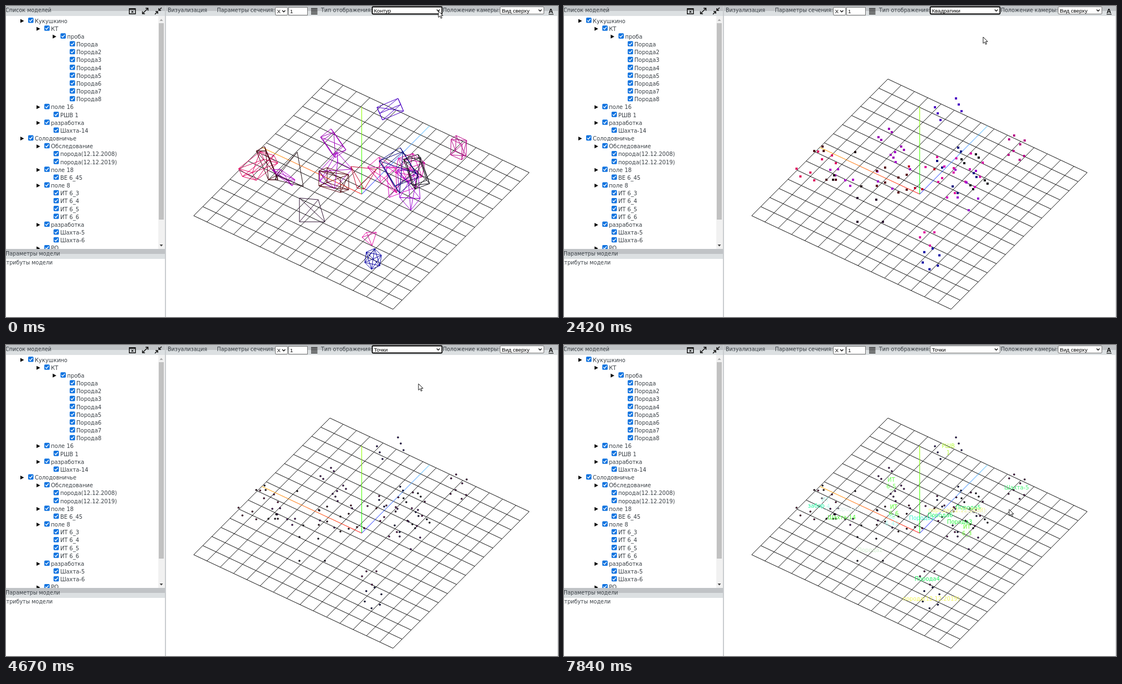
An HTML page for the animation above (7990 ms loop, 997x562 px).

```html
<!DOCTYPE html>
<html lang="ru">
<head>
<meta charset="utf-8">
<title>Визуализация</title>
<style>
html, body { margin: 0; width: 100%; height: 100%; overflow: hidden; background: #fff; }
svg { display: block; width: 997px; height: 562px; }
text { font-family: "DejaVu Sans", sans-serif; font-size: 9.6px; fill: #3a4046; white-space: pre; }
.tree text { font-size: 9.95px; }
.labels text { font-size: 10px; text-anchor: middle; }
text.ui { font-family: "Liberation Sans", Arial, sans-serif; font-size: 9.6px; fill: #000; }
</style>
</head>
<body>
<svg id="stage" viewBox="0 0 997 562"></svg>
<script>
const LOOP = 7990, TICK = LOOP / 60;
const stage = document.getElementById('stage');

function el(tag, attrs = {}, parent = stage) {
  const node = document.createElementNS('http://www.w3.org/2000/svg', tag);
  for (const k in attrs) node.setAttribute(k, attrs[k]);
  parent.appendChild(node);
  return node;
}
const group = (parent = stage, attrs = {}) => el('g', attrs, parent);
const rect = (x, y, width, height, fill, parent, more) =>
  el('rect', { x, y, width, height, fill, ...more }, parent);
const path = (d, stroke, parent, more) =>
  el('path', { d, stroke, fill: 'none', ...more }, parent);
function text(x, y, str, parent, more) {
  const node = el('text', { x, y, ...more }, parent);
  node.textContent = str;
  return node;
}
const ui = (x, y, str, parent) => text(x, y, str, parent, { class: 'ui' });
const defs = el('defs');

// Scene: grid and axes
const scene = group();
let grid = '';
for (let i = 0; i <= 15; i++) {
  const k = i / 15;
  grid += `M${585 - 246 * k} ${132 + 247 * k}l360 169M${585 + 360 * k} ${132 + 169 * k}l-246 247`;
}
path(grid, '#111', scene);

function axis(id, x, y, from, to) {
  const g = el('linearGradient', { id, gradientUnits: 'userSpaceOnUse',
    x1: 642.5, y1: 340, x2: x, y2: y }, defs);
  el('stop', { offset: 0, 'stop-color': from }, g);
  el('stop', { offset: 1, 'stop-color': to }, g);
  path(`M642.5 340L${x} ${y}`, `url(#${id})`, scene);
}
axis('ax', 462, 255.5, '#f00', '#fa0');
axis('ay', 642.5, 182, '#0f0', '#9f0');
axis('az', 765, 216.5, '#00f', '#3bf');

// Models: the same vertices shown as wires, squares or dots
const views = { 'Контур': group(scene), 'Квадратики': group(scene), 'Точки': group(scene) };
const labels = group(stage, { class: 'labels' });

const parse = s => s.split(' ').map(p => p.split(',').map(Number));
const invert = c => '#' + (0xffffff - parseInt(c.slice(1), 16)).toString(16).padStart(6, '0');
const middle = list => (Math.min(...list) + Math.max(...list)) / 2;

function model(name, color, pts, edges) {
  path(edges.map(([a, b]) => `M${pts[a]}L${pts[b]}`).join(''), color, views['Контур']);
  for (const [x, y] of pts) {
    rect(x - 2, y - 2, 4, 4, color, views['Квадратики']);
    el('circle', { cx: x, cy: y, r: 1.8, fill: '#0a0a10' }, views['Точки']);
    el('circle', { cx: x, cy: y, r: 0.7, fill: color }, views['Точки']);
  }
  // Names sit at the middle of the model in the opposite colour
  const x = middle(pts.map(p => p[0])), y = middle(pts.map(p => p[1]));
  const lines = name.split(' ');
  lines.forEach((line, i) => text(x, y + 5 + 12 * i - 6 * (lines.length - 1), line, labels,
    { style: 'fill:' + invert(color) }));
}
// Every vertex joined to every other
function hull(name, color, pts) {
  const edges = pts.flatMap((_, a) => pts.slice(0, a).map((_, b) => [a, b]));
  model(name, color, pts, edges);
}
// A base outline swept along (dx, dy), with triangulated sides
function prism(name, color, base, dx, dy) {
  const near = parse(base), n = near.length, edges = [[0, 2], [n, n + 2]];
  const far = near.map(([x, y]) => [x + dx, y + dy]);
  for (let i = 0; i < n; i++) {
    const j = (i + 1) % n;
    edges.push([i, j], [n + i, n + j], [i, n + i], [i, n + j]);
  }
  model(name, color, [...near, ...far], edges);
}
function gem(name, color, cx, cy, rx, ry) {
  hull(name, color, Array.from({ length: 6 }, (_, i) => {
    const a = (i * 60 - 80) * Math.PI / 180;
    return [cx + rx * Math.cos(a), cy + ry * Math.sin(a)];
  }));
}

prism('РШВ 1', '#4a00c4', '670,183 680,206 675,194', 38, -16);
prism('Шахта-5', '#b80a88', '804,241 813,234 832,243 824,250', -1, 28);
prism('ИТ 6_5', '#9a00b4', '568,237 587,222 592,228 573,242', 22, 32);
prism('забор', '#e00a62', '459,263 484,270 491,284 466,277', -39, 31);
prism('ИТ 6_4', '#4c0714', '452,262 467,254 469,262', 22, 52);
prism('Шахта-14', '#b000c8', '481,296 495,295 490,306', 27, 19);
hull('Порода7', '#241216', parse('526,264 537,326 488,306 486,314'));
prism('ИТ 6_6', '#a400cc', '566,299 593,330 567,317', 32, -35);
prism('ВЕ 6_45', '#5a0a14', '565,298 580,292 619,305 604,310', 0, 27);
hull('Порода1', '#c00a30', parse('623,290 634,329 647,331 669,295'));
hull('Порода2', '#2c1030', parse('530,347 564,350 576,390 530,390'));
hull('Порода4', '#e010a0', parse('651,409 669,409 643,418 661,433'));
gem('порода(12.12.2019)', '#0c08a4', 663, 457, 16, 19);
prism('Порода6', '#e00c9c', '653,291 674,273 676,318', 30, 20);
gem('Порода5', '#d808a4', 730, 292, 28, 26);
hull('Порода3', '#d808c0', parse('687,290 692,346 733,295 742,327'));
prism('ИТ 6_3', '#9c08d0', '711,346 731,369 748,348', -4, -50);
prism('порода(12.12.2008)', '#0a0a80', '674,280 712,256 717,263 683,292', 28, 46);
prism('Порода8', '#121018', '718,277 744,268 749,274 723,284', 16, 47);

// Panels
function bar(x, y, w, h) {
  rect(x, y, w, h, '#dce0e2');
  rect(x, y, w, h / 2, '#c0c3c6');
}
bar(0, 0, 287, 18);
bar(289, 0, 708, 18);
bar(0, 439, 287, 18);
rect(287, 0, 2, 562, '#c9cccf');
rect(996, 18, 1, 544, '#d4d6d8');
text(-1, 11, 'Список моделей');
text(-1, 451, 'Параметры модели');
text(-6, 467, 'Атрибуты модели');

rect(275, 18, 12, 421, '#f1f1f1');
rect(276, 31, 9, 355, '#c1c1c1');
path('M277.5 27h6l-3 -3.5z', 'none', stage, { fill: '#a8a8a8' });
path('M277.5 431h6l-3 3.5z', 'none', stage, { fill: '#444' });

// Tree: a leading digit is the depth, "+" marks a branch
const rows = ['0+Кукушкино', '1+КТ', '2+проба', '3 Порода',
  ...[2, 3, 4, 5, 6, 7, 8].map(n => '3 Порода' + n),
  '1+поле 16', '2 РШВ 1', '1+разработка', '2 Шахта-14', '0+Солодовничье',
  '1+Обследование', '2 порода(12.12.2008)', '2 порода(12.12.2019)',
  '1+поле 18', '2 ВЕ 6_45', '1+поле 8',
  ...[3, 4, 5, 6].map(n => '2 ИТ 6_' + n),
  '1+разработка', '2 Шахта-5', '2 Шахта-6', '1+РО'];
rect(0, 18, 275, 421, '#000', el('clipPath', { id: 'treeBox' }, defs));
const tree = group(stage, { class: 'tree', 'clip-path': 'url(#treeBox)' });
rows.forEach((row, i) => {
  const branch = row[1] === '+', y = 26.5 + 14.17 * i;
  const x = 40 + row[0] * 29.2 - (branch ? 0 : 12.5);
  if (branch) path(`M${x - 14} ${y - 3}v7l6.5 -3.5z`, 'none', tree, { fill: '#000' });
  rect(x, y - 5.5, 9.6, 9.6, '#0f73e0', tree, { rx: 1.6 });
  path(`M${x + 2} ${y - 0.6}l2 2.2l3.8 -4.6`, '#fff', tree, { 'stroke-width': 1.4 });
  text(x + 12, y + 4, row.slice(2), tree);
});

// Header icons
const icon = (d, width = 1.5) => path(d, '#111', stage, { 'stroke-width': width });
icon('M222.7 4.7h11v9.6h-11zM222 6h12');
icon('M226.5 8.7l3.6 3.6m0 -3.6l-3.6 3.6', 1.2);
icon('M247 13.5l9 -9M252 4h4.5v4.5M246.5 9.5v4.5h4.5');
icon('M269 15l4.8 -4.8M276.2 7.8l4.8 -4.8M270 10h4v4M280 8h-4v-4');
for (let i = 0; i < 5; i++) icon(`M551 ${4.5 + 2.5 * i}h11.5`, 1.3);

// Toolbar
text(292, 11, 'Визуализация');
text(381, 11, 'Параметры сечения:');
text(569, 11, 'Тип отображения:');
text(789, 11, 'Положение камеры:');

function select(x, y, w, h, value) {
  const box = rect(x + 0.5, y + 0.5, w - 1, h - 1, '#fff', stage, { stroke: '#767676', rx: 1.5 });
  const cy = y + h / 2;
  icon(`M${x + w - 10} ${cy - 1.5}l2.7 2.8l2.7 -2.8`, 1.4);
  return { box, caption: ui(x + 3.5, cy + 3.5, value) };
}
select(486, 2, 23, 15, 'X');
rect(510.5, 2.5, 34, 14, '#fff', stage, { stroke: '#767676' });
ui(513, 12.5, '1');
const kind = select(661, 1, 127, 14, 'Контур');
select(892, 1, 80, 14, 'Вид сверху');
text(980, 13, 'A', stage, { style: 'font:bold 11.5px "Liberation Sans",sans-serif;fill:#111' });
rect(980, 14.3, 9, 1.2, '#111');

// Drop-down list
const TOP = 16, ROW = 12.2;
const names = ['Контур', 'Двусторонняя заливка', 'Односторонняя заливка',
  'Квадратики', 'Точки', 'Прозрачность'];
const menu = group();
rect(663, 17, 127, 75, '#000', menu, { opacity: 0.12 });
rect(661.5, 15.5, 127, 74.5, '#fff', menu, { stroke: '#777' });
const mark = rect(662, TOP, 126, ROW, '#1e90f0', menu);
const items = names.map((s, i) => ui(665, TOP + 9.3 + ROW * i, s, menu));

// Pointers
const pointer = d => path(d, '#000', stage, { fill: '#fff', 'stroke-width': 0.9 });
const arrow = pointer('M0 0v11.5l2.7 -2.5l1.9 4.3l1.9 -.8l-1.9 -4.2h3.6z');
const hand = pointer('M-1 1q1 -1.4 2 0v5l5 1q1.5 .4 1.4 2l-.6 5v2h-6.3v-2l-4 -4.5q.5 -1.5 2.5 0zM3 6v3M5 6.5v3');

// Pointer strokes, timed in ticks; the picture advances once per tick
const strokes = [
  { from: 4, to: 7, x: 761, y: 41 },
  { from: 13, to: 14.3, x: 757, y: 56 },
  { from: 18, to: 22, x: 786, y: 8 },
  { from: 26, to: 30, x: 759, y: 67 },
  { from: 34, to: 35, x: 745, y: 70 },
  { from: 39, to: 43, x: 924, y: 13 },
  { from: 45, to: 49, x: 990, y: 11 },
  { from: 57, to: 59, x: 804, y: 297 }];

function pointerAt(tick) {
  let x = 781, y = 9;
  for (const s of strokes) {
    const k = Math.min(1, Math.max(0, (tick - s.from) / (s.to - s.from)));
    const ease = k * k * (3 - 2 * k);
    x += (s.x - x) * ease;
    y += (s.y - y) * ease;
  }
  return { x, y };
}
const show = (node, on) => { node.style.display = on ? '' : 'none'; };
const within = (v, a, b) => v >= a && v < b;

function render(now) {
  const tick = Math.floor(now % LOOP / TICK + 0.15);
  const view = tick < 18 ? 'Контур' : tick < 35 ? 'Квадратики' : 'Точки';
  const open = within(tick, 2, 18) || within(tick, 26, 35);
  const focused = !open && tick < 54;
  const pointing = within(tick, 48, 56);

  for (const name in views) show(views[name], name === view);
  show(labels, tick >= 56);
  kind.caption.textContent = view;
  kind.box.setAttribute('stroke', focused ? '#000' : '#767676');
  kind.box.setAttribute('stroke-width', focused ? 1.8 : 1);

  // The highlight follows the pointer one tick late
  const late = pointerAt(tick - 1).y;
  const pick = late < TOP ? names.indexOf(view) : Math.floor((late - TOP) / ROW);
  show(menu, open);
  mark.setAttribute('y', TOP + ROW * pick);
  items.forEach((item, i) => { item.style.fill = i === pick ? '#fff' : '#000'; });

  const { x, y } = pointerAt(tick);
  show(arrow, !pointing);
  show(hand, pointing);
  (pointing ? hand : arrow).setAttribute('transform', `translate(${x} ${y})`);
}
function loop() {
  render(performance.now());
  requestAnimationFrame(loop);
}
loop();
</script>
</body>
</html>
```
